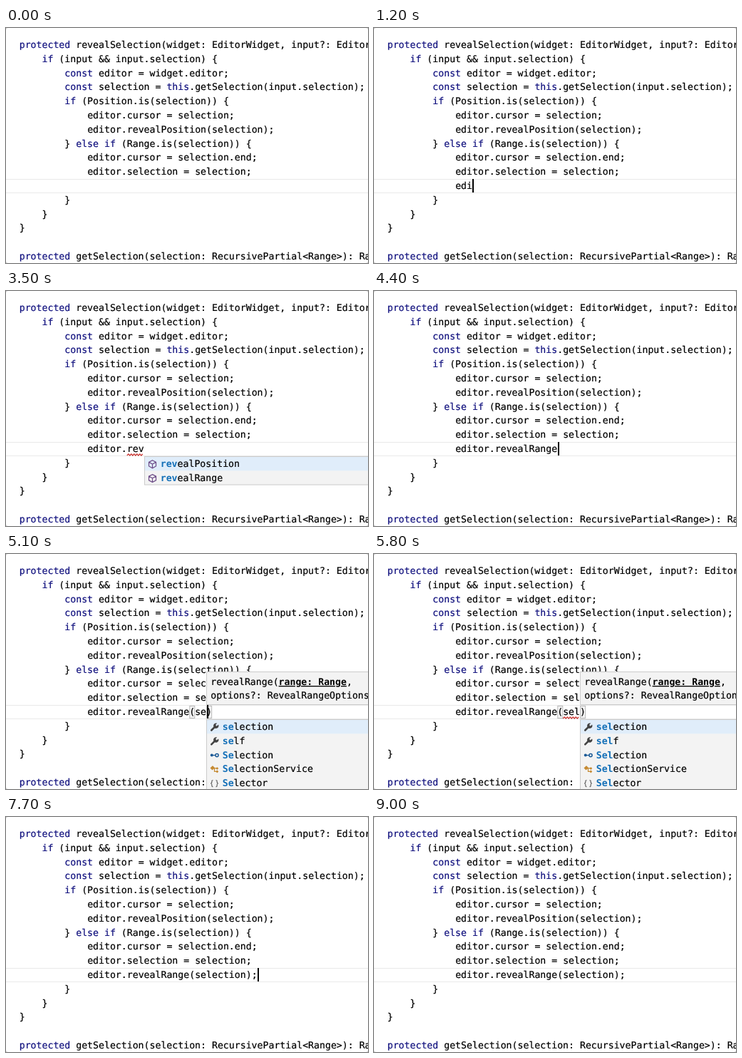
Write an HTML page that moves like this. It is 508 px wide and 330 px high and loops after 9.1 s.

```html
<!DOCTYPE html>
<html lang="en">
<head>
<meta charset="utf-8">
<title>Code completion</title>
<style>
  html, body { margin: 0; width: 100%; height: 100%; overflow: hidden; background: #ccc; }
  svg { display: block; width: 508px; height: 330px; }
  text {
    font: 13.21px "DejaVu Sans Mono", monospace; white-space: pre; text-rendering: geometricPrecision;
    stroke: #000; stroke-width: .2px;
  }
  .key { fill: #10107e; stroke: #10107e; }
  .hit { fill: #1470b8; stroke: none; font-weight: bold; }
  .arg { stroke: none; font-weight: bold; text-decoration: underline; }
  .box { fill: #f3f3f3; stroke: #cbcbcb; }
  .pair { fill: #f4f4f4; stroke: #b9b9b9; }
</style>
</head>
<body>
<svg id="stage" viewBox="0 0 508 330">
  <rect width="508" height="330" rx="3" fill="#fff"/>
  <path d="M0 212.5H508M0 231.5H508" stroke="#e9e9e9"/>
  <g id="code"></g>
  <g id="live"></g>
</svg>
<script>
const LOOP = 9100, LEFT = 18.7, CHAR = 7.953, LINE = 19.8, BASE = 28, ROW = 10, INDENT = 12;

const source = [
  'protected revealSelection(widget: EditorWidget, input?: EditorOpenerOptions',
  '    if (input && input.selection) {',
  '        const editor = widget.editor;',
  '        const selection = this.getSelection(input.selection);',
  '        if (Position.is(selection)) {',
  '            editor.cursor = selection;',
  '            editor.revealPosition(selection);',
  '        } else if (Range.is(selection)) {',
  '            editor.cursor = selection.end;',
  '            editor.selection = selection;',
  '',
  '        }',
  '    }',
  '}',
  '',
  'protected getSelection(selection: RecursivePartial<Range>): Range'
];

// time, text before the caret, text after it
const edits = [
  [900, 'e'], [1050, 'ed'], [1200, 'edi'], [1350, 'edit'], [1500, 'edito'], [1650, 'editor'],
  [2000, 'editor.'],
  [2600, 'editor.r'], [2800, 'editor.re'], [3000, 'editor.rev'],
  [4200, 'editor.revealRange'],
  [4700, 'editor.revealRange(', ')'],
  [4950, 'editor.revealRange(s', ')'], [5100, 'editor.revealRange(se', ')'], [5250, 'editor.revealRange(sel', ')'],
  [6400, 'editor.revealRange(selection', ')'],
  [7100, 'editor.revealRange(selection)'],
  [7500, 'editor.revealRange(selection);']
];

const members = [['cube', 'blur'], ['wrench', 'cursor'], ['cube', 'dispose'], ['wrench', 'document'], ['cube', 'focus']];
const reveals = [['cube', 'revealPosition'], ['cube', 'revealRange']];
const values = [['wrench', 'selection'], ['wrench', 'self'], ['link', 'Selection'], ['tree', 'SelectionService'], ['braces', 'Selector']];

// from, to, rows, chosen row
const lists = [
  [2100, 2600, members, 0],
  [2600, 3800, reveals, 0],
  [3800, 4200, reveals, 1],
  [4950, 6400, values, 0]
];

const icons = {
  cube: '<path d="M6 .8 11 3.4V9L6 11.7 1 9V3.4ZM1 3.4 6 6 11 3.4M6 6V11.7" fill="none" stroke="#6b4a86" stroke-width="1.2"/>',
  wrench: '<path d="M1.8 10.5 6.5 5.8" stroke="#424242" stroke-width="2.6" stroke-linecap="round"/>' +
    '<path d="M9.7.8 7.5 3 9.1 4.7 11.6 2.6A3.7 3.7 0 1 1 9.7.8Z" fill="#424242"/>',
  link: '<path d="M3 6H8" stroke="#1b5a96" stroke-width="1.3"/><circle cx="2.3" cy="6" r="2" fill="#1b5a96"/>' +
    '<circle cx="9.5" cy="6" r="2.1" fill="#f3f3f3" stroke="#1b5a96" stroke-width="1.5"/>',
  tree: '<path d="M4 4.5H9M6 4.5V9H9" fill="none" stroke="#c58a32" stroke-width="1.2"/>' +
    '<path d="M3.5.8 6.6 3.8 3 7.2 0 4.2ZM9.8 2.8 11.8 4.7 9.8 6.6 7.9 4.7ZM9.8 7.2 11.8 9.1 9.8 11 7.9 9.1Z" fill="#c58a32"/>',
  braces: '<path d="M4 1.5Q2.2 1.5 2.4 3.5T.8 6Q2.6 6.3 2.4 8.5T4 10.5M8 1.5Q9.8 1.5 9.6 3.5T11.2 6Q9.4 6.3 9.6 8.5T8 10.5" fill="none" stroke="#555" stroke-width="1.1"/>'
};

const byId = id => document.getElementById(id);
const escapeText = s => s.replace(/&/g, '&amp;').replace(/</g, '&lt;');
const colour = s => escapeText(s).replace(/\b(protected|const|this|if|else)\b/g, '<tspan class="key">$1</tspan>');
const text = (x, y, body) => `<text x="${x}" y="${y}">${body}</text>`;
const rect = (x, y, w, h, attrs) => `<rect x="${x}" y="${y}" width="${w}" height="${h}" ${attrs}/>`;
const column = n => LEFT + (INDENT + n) * CHAR;

byId('code').innerHTML = source.map((line, i) => {
  const body = line.trimStart();
  return text(LEFT + (line.length - body.length) * CHAR, BASE + i * LINE, colour(body));
}).join('');

function squiggle(from, to) {
  let d = `M${from} 231`;
  for (let x = from + 2, up = true; x <= to; x += 2, up = !up) d += `L${x} ${up ? 228.8 : 231}`;
  return `<path d="${d}" fill="none" stroke="#c8302c" stroke-width="1.2"/>`;
}

function listBox(x, rows, chosen, prefix) {
  const n = prefix.length;
  return rect(x, 232.5, 400, rows.length * LINE, 'class="box"') +
    rect(x + .5, 233 + chosen * LINE, 400, LINE - .5, 'fill="#e0edfa"') +
    rows.map(([icon, name], i) =>
      `<g transform="translate(${x + 5} ${237 + i * LINE})">${icons[icon]}</g>` +
      text(x + 22.2, 247 + i * LINE, `<tspan class="hit">${name.slice(0, n)}</tspan>${name.slice(n)}`)
    ).join('');
}

function hintBox(x) {
  return rect(x, 165.5, 400, 46, 'class="box"') +
    text(x + 5.7, 184, 'revealRange(<tspan class="arg">range: Range</tspan>,') +
    text(x + 5.7, 203, 'options?: RevealRangeOptions): void');
}

function draw(t) {
  const [at, before, after = ''] = edits.findLast(e => e[0] <= t) || [edits.at(-1)[0] - LOOP, ''];
  const y = BASE + ROW * LINE, caret = column(before.length);
  const open = before.indexOf('('), edge = Math.round(caret) + .5;
  const word = before.match(/\w*$/)[0];
  let out = '';

  if (after) {
    out += rect(column(open) + .5, 213.5, 7, 17, 'class="pair"') + rect(caret + .5, 213.5, 7, 17, 'class="pair"');
  }
  out += text(column(0), y, before + after);
  if ((word === 'rev' || word === 'sel') && t - at >= 200) out += squiggle(column(before.length - 3), caret);
  if ((t - at) % 1000 < 500) out += rect(Math.round(caret + .5), 212, 2, 19, 'fill="#000"');

  const list = lists.find(([from, to]) => t >= from && t < to);
  if (list) out += listBox(edge, list[2], list[3], list[2] === members ? '' : word);
  if (after && t >= 4800) out += hintBox(edge);
  byId('live').innerHTML = out;
}

let start;
function tick(now) {
  start ??= now;
  draw((now - start) % LOOP);
  requestAnimationFrame(tick);
}
draw(0);
requestAnimationFrame(tick);
</script>
</body>
</html>
```
